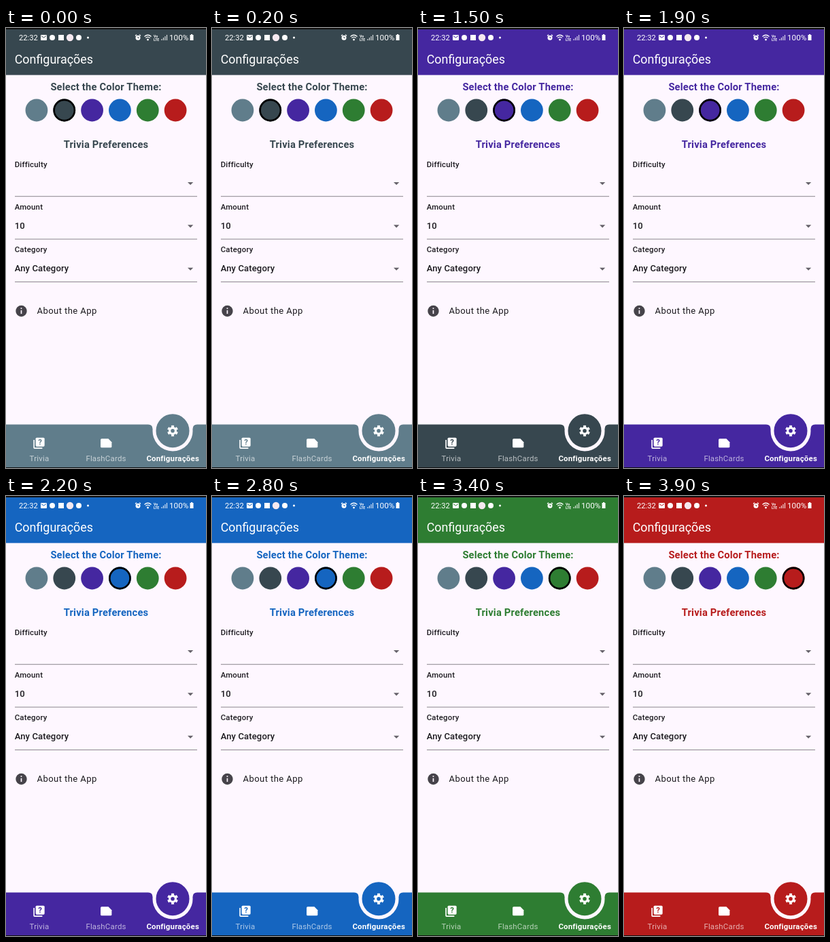
An HTML page for the animation above (4000 ms loop, 294 by 642 pixels).

```html
<!DOCTYPE html>
<html lang="pt">
<head>
<meta charset="utf-8">
<title>Configurações</title>
<style>
  html, body { margin: 0; width: 100%; height: 100%; overflow: hidden; background: #111; }
  svg { display: block; width: 294px; height: 642px; font-family: Roboto, sans-serif; }
  .theme { fill: var(--theme); }
  .nav { fill: var(--nav); }
  .light { fill: #fff; }
  .dark { fill: #1d1b20; }
  .mid { text-anchor: middle; }
  .title { font: 700 14.7px Roboto, sans-serif; letter-spacing: .2px; }
  .label { font: 500 11.43px Roboto, sans-serif; letter-spacing: .2px; }
  .value { font: 500 13.07px Roboto, sans-serif; letter-spacing: .12px; }
  .tab { font-size: 11.43px; letter-spacing: .2px; }
  .faded { fill-opacity: .65; }
</style>
</head>
<body>
<svg viewBox="0 0 294 642">
  <clipPath id="screen"><rect y="2" width="294" height="639"/></clipPath>
  <g clip-path="url(#screen)">
    <rect width="294" height="642" fill="#fef7ff"/>
    <rect class="theme" width="294" height="68.6"/>

    <!-- Status bar -->
    <g class="light">
      <text x="19" y="18" font-size="11.2">22:32</text>
      <rect x="51" y="10" width="9" height="8" rx="1"/>
      <path d="M52 11.5l3.5 2.7 3.5-2.7" fill="none" stroke="var(--theme)"/>
      <circle cx="68" cy="14" r="4"/>
      <rect x="77" y="10" width="8" height="8"/>
      <circle cx="94" cy="14" r="5.2" fill="#f6e9f0"/>
      <circle cx="107" cy="14" r="4"/>
      <circle cx="120.5" cy="14" r="1.5"/>
      <circle cx="194" cy="14.3" r="3.5"/>
      <g fill="none" stroke="#fff" stroke-width="1.2">
        <path d="M190 11.5l2-1.8M198 11.5l-2-1.8"/>
        <path d="M203.5 12.5q5-4.5 10 0M205.3 14.5q3.2-2.7 6.4 0"/>
        <path d="M229 18v-2M231.5 18v-4M234 18v-6M236.5 18v-8" stroke-opacity=".8"/>
      </g>
      <path d="M194 12.5v2h1.5" fill="none" stroke="var(--theme)"/>
      <circle cx="208.5" cy="17" r="1.4"/>
      <g font-size="5" font-weight="700">
        <text x="217" y="13.5">Vo</text>
        <text x="217" y="18.5">LTE</text>
      </g>
      <text x="240" y="18" font-size="11.7">100%</text>
      <path d="M270.5 10h1.500v-1h2v1h1.500v8h-5z"/>
      <text x="12.7" y="52" font-size="17.9">Configurações</text>
    </g>

    <text class="theme title mid" x="147" y="91">Select the Color Theme:</text>
    <g id="swatches"></g>
    <text class="theme title mid" x="147" y="175">Trivia Preferences</text>
    <g id="fields"></g>

    <circle cx="22.5" cy="413" r="8.2" fill="#46434a"/>
    <path d="M22.5 408.2v1.7M22.5 411.8v5.3" stroke="#fef7ff" stroke-width="1.7"/>
    <text class="dark" x="45.5" y="417" font-size="13.07" letter-spacing=".41">About the App</text>

    <!-- Bottom navigation -->
    <path class="nav" d="M0 578.6H209Q215.6 578.6 215.6 585.6A29.5 29.5 0 1 0 274.4 585.6Q274.4 578.6 281 578.6H294V642H0z"/>
    <circle class="nav" cx="245" cy="587.7" r="24.5"/>
    <g class="light">
      <g transform="translate(38.7 596) scale(.8167)">
        <path d="M4 6H2v14c0 1.1.9 2 2 2h14v-2H4z"/>
        <rect x="6" y="2" width="16" height="16" rx="2"/>
        <text class="nav mid" x="14" y="15" font-size="14" font-weight="700">?</text>
      </g>
      <path transform="translate(137.4 596) scale(.8167)"
        d="M22 10l-6-6H4q-2 0-2 2v12q0 2 2 2h16q2 0 2-2z"/>
      <g transform="translate(245 587.7)" fill="none" stroke="#fff">
        <circle r="4.4" stroke-width="3.2"/>
        <circle r="6.7" stroke-width="2.6" pathLength="12" stroke-dasharray="1.1 .9" stroke-dashoffset="-.45"/>
      </g>
      <text class="tab mid faded" x="49" y="632">Trivia</text>
      <text class="tab mid faded" x="147" y="632">FlashCards</text>
      <text class="tab mid" x="245.2" y="632" font-weight="700">Configurações</text>
    </g>
  </g>
</svg>
<script>
const LOOP = 4000, NAV_FADE = 200;
const colors = ['#607d8b', '#37474f', '#4527a0', '#1565c0', '#2e7d32', '#b71c1c'];
// Each tap recolours the page at once; the navigation bar follows with a fade.
const taps = [
  { at: 0, nav: 200 },
  { at: 1200, nav: 1500 },
  { at: 2200, nav: 2300 },
  { at: 3000, nav: 3100 },
  { at: 3700, nav: 3700 },
];
const fields = [['Difficulty', ''], ['Amount', '10'], ['Category', 'Any Category']];
const byId = id => document.getElementById(id);
const swatchX = i => 147 + (i - 2.5) * 40.83;

byId('swatches').innerHTML = colors.map((color, i) =>
  `<circle cx="${swatchX(i)}" cy="120" r="16.4" fill="${color}"/>`
).join('') + '<circle id="ring" cy="120" r="15.1" fill="none" stroke="#000" stroke-width="2.6"/>';

byId('fields').innerHTML = fields.map(([label, value], i) => {
  const y = 202.7 + i * 62.35;
  return `<text class="dark label" x="12.7" y="${y}">${label}</text>
    <text class="dark value" x="12.7" y="${y + 28}">${value}</text>
    <path d="M267 ${y + 22.3}h8.2l-4.1 4.1z" fill="#66626a"/>
    <rect x="13" y="${y + 42.5}" width="268" height="1" fill="#8b878d"/>`;
}).join('');

function draw() {
  const t = performance.now() % LOOP;
  const step = taps.findLastIndex(tap => t >= tap.at);
  const fade = Math.min(1, Math.max(0, (t - taps[step].nav) / NAV_FADE));
  const style = document.documentElement.style;
  style.setProperty('--theme', colors[step + 1]);
  style.setProperty('--nav', `color-mix(in srgb, ${colors[step + 1]} ${fade * 100}%, ${colors[step]})`);
  byId('ring').setAttribute('cx', swatchX(step + 1));
  requestAnimationFrame(draw);
}
draw();
</script>
</body>
</html>
```
